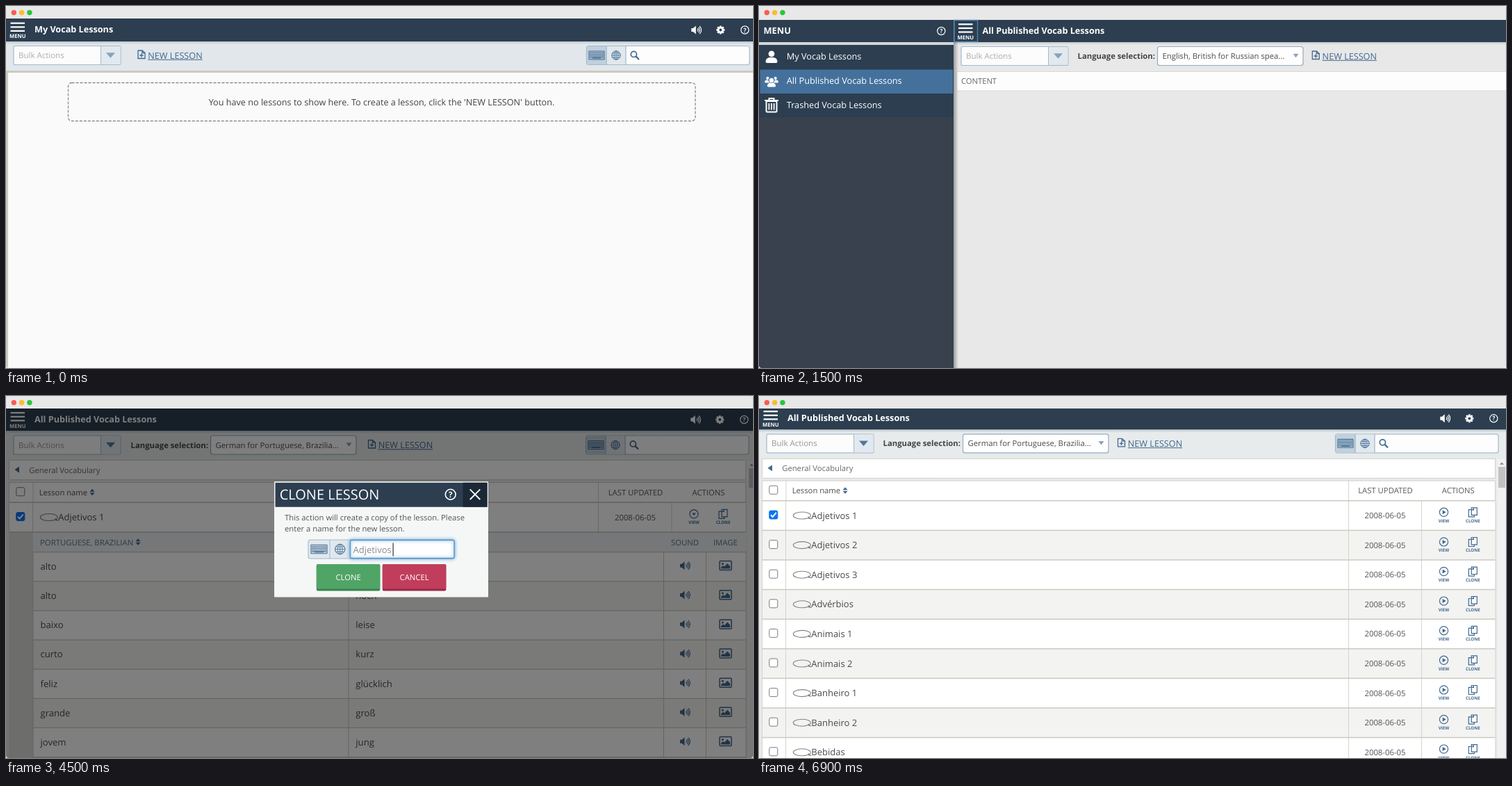
Write an HTML page with a canvas that moves like this. It is 1075x521 px and loops after 7500 ms.

```html
<!DOCTYPE html>
<html lang="en">
<head>
<meta charset="utf-8">
<title>Vocab lessons</title>
<style>
html, body { margin: 0; width: 100%; height: 100%; overflow: hidden; background: #fff; }
canvas { display: block; width: 1075px; height: 521px; }
</style>
</head>
<body>
<canvas id="stage"></canvas>
<script>
const W = 1075, H = 521, HOLD = 1500;
const NAVY = '#2c3e50', BLUE = '#41698f', PALE = '#86a4be', EDGE = '#a5bacb', INK = '#4c4c4c';
const canvas = document.getElementById('stage');
const c = canvas.getContext('2d');
const ratio = window.devicePixelRatio || 1;
canvas.width = W * ratio;
canvas.height = H * ratio;

// ---- primitives ----
function rect(x, y, w, h, fill) {
  c.fillStyle = fill;
  c.fillRect(x, y, w, h);
}

function box(x, y, w, h, fill, edge, r = 0, line = 1) {
  c.beginPath();
  c.roundRect(x, y, w, h, r);
  if (fill) { c.fillStyle = fill; c.fill(); }
  if (edge) { c.strokeStyle = edge; c.lineWidth = line; c.stroke(); }
}

// y is the middle of the capital letters
function text(s, x, y, size, color = INK, weight = 400, align = 'left', family = '"Open Sans", sans-serif') {
  c.font = `${weight} ${size}px ${family}`;
  c.textAlign = align;
  c.fillStyle = color;
  c.fillText(s, x, y + size * 0.357);
  return c.measureText(s).width;
}

function poly(points, fill) {
  c.beginPath();
  points.forEach(([x, y]) => c.lineTo(x, y));
  c.closePath();
  c.fillStyle = fill;
  c.fill();
}

function lines(color, width, ...paths) {
  c.strokeStyle = color;
  c.lineWidth = width;
  c.beginPath();
  for (const p of paths) p.forEach(([x, y], i) => i ? c.lineTo(x, y) : c.moveTo(x, y));
  c.stroke();
}

function ring(x, y, rx, ry, color, width, from = 0, to = Math.PI * 2) {
  c.beginPath();
  c.ellipse(x, y, rx, ry, 0, from, to);
  c.strokeStyle = color;
  c.lineWidth = width;
  c.stroke();
}

function disc(x, y, r, color) {
  c.beginPath();
  c.arc(x, y, r, 0, Math.PI * 2);
  c.fillStyle = color;
  c.fill();
}

function fade(x, y, w, h, from, to, across) {
  const g = c.createLinearGradient(x, y, across ? x + w : x, across ? y : y + h);
  g.addColorStop(0, from);
  g.addColorStop(1, to);
  rect(x, y, w, h, g);
}

const down = (x, y, w, h, color) =>
  poly([[x - w / 2, y - h / 2], [x + w / 2, y - h / 2], [x, y + h / 2]], color);

// ---- icons ----
function speaker(x, y, color) {
  poly([[x - 7, y - 2.5], [x - 4.5, y - 2.5], [x - 0.5, y - 6], [x - 0.5, y + 6], [x - 4.5, y + 2.5], [x - 7, y + 2.5]], color);
  for (const r of [2.6, 5, 7.3]) ring(x, y, r, r, color, 1.2, -0.85, 0.85);
}

function gear(x, y) {
  for (let i = 0; i < 4; i++) {
    c.save();
    c.translate(x, y);
    c.rotate(i * Math.PI / 4);
    rect(-1.4, -6, 2.8, 12, '#fff');
    c.restore();
  }
  disc(x, y, 4.6, '#fff');
  disc(x, y, 1.9, NAVY);
}

function help(x, y, r = 5.6) {
  ring(x, y, r, r, '#fff', r / 4.6);
  text('?', x, y, r * 1.55, '#fff', 700, 'center');
}

function keyboard(x, y, w = 22, color = BLUE) {
  const h = w * 0.54, step = w / 11;
  box(x - w / 2, y - h / 2, w, h, null, color, 0.5, 1.1);
  for (let row = 0; row < 4; row++)
    for (let i = 0; i < 10; i++)
      rect(x - w / 2 + step * (i + 0.65), y - h / 2 + 1.5 + row * (h - 2.5) / 4, step * 0.72, step * 0.8, color);
  rect(x - w * 0.28, y + h / 2 - 3.2, w * 0.56, 1.8, color);
}

function globe(x, y, r = 6.2, color = BLUE) {
  ring(x, y, r, r, color, 1);
  ring(x, y, r * 0.48, r, color, 0.8);
  const k = r * 0.87, q = r * 0.5;
  lines(color, 0.8, [[x - r, y], [x + r, y]], [[x, y - r], [x, y + r]],
    [[x - k, y - q], [x + k, y - q]], [[x - k, y + q], [x + k, y + q]]);
}

function search(x, y) {
  ring(x - 1.6, y - 1.6, 4.1, 4.1, BLUE, 1.7);
  lines(BLUE, 2.2, [[x + 1.6, y + 1.6], [x + 6, y + 6]]);
}

function page(x, y) {
  lines(BLUE, 1.3, [[x, y - 6], [x + 6, y - 6], [x + 10, y - 2.5], [x + 10, y + 5.5], [x, y + 5.5], [x, y - 6.6]],
    [[x + 6, y - 6], [x + 6, y - 2.5], [x + 10, y - 2.5]],
    [[x + 2.3, y + 1], [x + 7.7, y + 1]], [[x + 5, y - 1.7], [x + 5, y + 3.7]]);
}

function picture(x, y) {
  box(x - 8.5, y - 6.5, 17, 13, null, BLUE, 1, 1.5);
  disc(x - 4.2, y - 2.5, 1.5, BLUE);
  poly([[x - 6.5, y + 4.5], [x - 6.5, y + 2.5], [x - 3.5, y], [x - 1.5, y + 1.5], [x + 2.5, y - 3], [x + 6.5, y + 1], [x + 6.5, y + 4.5]], BLUE);
}

function person(x, y, s, color = '#fff') {
  disc(x, y - 4.2 * s, 4.4 * s, color);
  c.beginPath();
  c.roundRect(x - 8.5 * s, y + 1 * s, 17 * s, 8 * s, [6 * s, 6 * s, 2 * s, 2 * s]);
  c.fillStyle = color;
  c.fill();
}

function trash(x, y) {
  box(x - 7.5, y - 6, 15, 15.5, null, '#fff', 1.5, 2);
  lines('#fff', 2, [[x - 10, y - 7], [x + 10, y - 7]], [[x - 3.5, y - 7], [x - 3.5, y - 10], [x + 3.5, y - 10], [x + 3.5, y - 7]]);
  lines('#fff', 1.8, ...[-3.6, 0, 3.6].map(d => [[x + d, y - 3], [x + d, y + 6.5]]));
}

function loopMark(x, y) {
  ring(x, y, 12.5, 5, '#858585', 1.1, 0.75, Math.PI * 2 + 0.25);
  lines('#777', 1.1, [[x + 12.3, y + 1], [x + 10, y + 4], [x + 13.5, y + 4.6]], [[x + 10, y + 4], [x + 9, y + 1.5]]);
}

function check(x, y, on) {
  box(x - 6, y - 6, 12, 12, on ? '#0b74f0' : '#fff', on ? '#0b74f0' : '#7b7b7b', 2, 1);
  if (on) lines('#fff', 2, [[x - 3.8, y + 0.2], [x - 1.2, y + 2.9], [x + 4, y - 3.2]]);
}

function rowActions(view, clone, y, open) {
  ring(view, y - 4.2, 6.1, 6.1, BLUE, 1.2);
  if (open) down(view, y - 3.7, 5.5, 3.6, BLUE);
  else poly([[view - 1.8, y - 7.2], [view + 3.2, y - 4.2], [view - 1.8, y - 1.2]], BLUE);
  text('VIEW', view, y + 8, 6.2, BLUE, 700, 'center');
  lines(BLUE, 1.2, [[clone - 2, y - 7.8], [clone - 6, y - 7.8], [clone - 6, y + 2.4], [clone + 2, y + 2.4], [clone + 2, y]]);
  box(clone - 2, y - 10.6, 8, 10.4, '#fff', BLUE, 0, 1.2);
  poly([[clone - 2, y - 7], [clone + 1.7, y - 7], [clone + 1.7, y - 10.6]], BLUE);
  text('CLONE', clone, y + 8, 6.2, BLUE, 700, 'center');
}

// ---- widgets ----
function titleBar(h) {
  rect(0, 0, W, h, '#e8e8e8');
  ['#f85d52', '#fbbb30', '#2ac63f'].forEach((color, i) => disc(11.3 + i * 11.3, 9.5, 3.7, color));
}

function header(x, top, bottom, title, y) {
  rect(x, top, W - x, bottom - top, NAVY);
  for (const d of [-9, -3.4, 2.2]) rect(x + 6.5, y + d - 1.1, 20.5, 2.2, '#fff');
  text('MENU', x + 16.8, y + 9.8, 7.7, '#fff', 700, 'center');
  text(title, x + 41, y, 12.65, '#fff', 700);
}

function headerIcons(right, y) {
  speaker(right - 70, y, '#fff');
  gear(right - 35, y);
  help(right, y);
}

function bulk(x, y, strong) {
  box(x, y - 13.5, 154, 27, '#fcfcfc', EDGE, 2, 1.2);
  rect(x + 126, y - 13, 27.5, 26, '#e2e9ee');
  lines(EDGE, 1, [[x + 125.5, y - 13.5], [x + 125.5, y + 13.5]]);
  text('Bulk Actions', x + 7, y, 11.5, strong ? '#959595' : '#adadad');
  down(x + 139.5, y, 13, 7.5, strong ? '#4b779f' : PALE);
}

function select(x, y, w, label) {
  box(x, y - 13.5, w, 27, '#fefefe', '#94acc0', 3, 1.2);
  text(label, x + 7, y, 11.3);
  down(x + w - 10.5, y - 0.5, 8, 5.5, PALE);
}

function link(label, x, y, size = 12.65, weight = 400, family) {
  const w = text(label, x, y, size, BLUE, weight, 'left', family);
  rect(x, y + size * 0.357 + 1.3, w, 1, BLUE);
}

function newLesson(x, y) {
  page(x, y - 1);
  link('NEW LESSON', x + 14.3, y);
}

function searchGroup(right, y) {
  box(right - 234.5, y - 13.5, 234.5, 27, '#fdfdfd', EDGE, 3, 1.2);
  rect(right - 234, y - 13, 28, 26, '#c0d0dd');
  rect(right - 206, y - 13, 28, 26, '#e1e8ee');
  lines('#92acc1', 1, [[right - 206, y - 13.5], [right - 206, y + 13.5]], [[right - 178, y - 13.5], [right - 178, y + 13.5]]);
  keyboard(right - 220, y);
  globe(right - 192, y);
  search(right - 165, y);
}

function language(x, y, label) {
  text('Language selection:', x, y, 11.3, '#444', 700);
  select(x + 115, y, 209.5, label);
}

function button(x, y, label, fill, base, ink = '#fff') {
  box(x, y, 91.5, 38.5, base, null, 2);
  box(x, y, 91.5, 35.5, fill, null, 2);
  text(label, x + 45.8, y + 19, 11.3, ink, 400, 'center');
}

function dialog(x, y, w, h, title, size, body) {
  box(x, y, w, h, body, '#f3f3ef', 0, 1);
  rect(x + 1, y + 1.2, w - 2, 35, NAVY);
  rect(x + w - 36, y + 1.2, 35, 35, '#1b2836');
  const m = y + 18.2, k = x + w - 18.5;
  text(title, x + 7.2, m, size, '#fff');
  help(x + w - 53.8, m, 7.4);
  lines('#fff', 1.8, [[k - 7.3, m - 7.3], [k + 7.3, m + 7.3]], [[k + 7.3, m - 7.3], [k - 7.3, m + 7.3]]);
}

function nameInput(x, y, split, field, right, soft) {
  box(x, y - 13.5, right - x, 27, '#e0e8ee', EDGE, 3, 1.1);
  lines(EDGE, 1, [[split, y - 13.5], [split, y + 13.5]]);
  const color = soft ? '#7d9dba' : BLUE;
  keyboard((x + split) / 2, y, soft ? 19 : 23, color);
  globe((split + field) / 2, y, soft ? 5.2 : 7.2, color);
  c.save();
  c.shadowColor = '#5aa2e0';
  c.shadowBlur = 5;
  box(field, y - 13, right - field, 26, '#fff', '#5c94c4', 2, 1.4);
  c.restore();
}

function dim() {
  rect(0, 0, W, H, 'rgba(0,0,0,.5)');
}

// ---- scenes ----
function emptyPage() {
  rect(0, 0, W + 10, H + 10, '#fafafa');
  rect(0, 51, W + 10, 43, '#e1e7eb');
  fade(0, 51, W + 10, 4, '#bcc6ce', '#e1e7eb');
  rect(0, 93, W + 10, 3, '#cecabf');
  rect(0, 94, 3, H, '#cecabf');
  header(0, 18, 51, 'My Vocab Lessons', 33.7);
  rect(W, 18, 10, 33, NAVY);
  headerIcons(1063.3, 34.5);
  bulk(11, 71);
  newLesson(190, 71);
  searchGroup(1070, 71);
  c.setLineDash([4, 2]);
  box(89.5, 110.5, 902.5, 55, null, '#8b8b8b', 5, 1.3);
  c.setLineDash([]);
  text("You have no lessons to show here. To create a lesson, click the 'NEW LESSON' button.", 540.5, 138, 12.63, '#444', 400, 'center');
}

function sceneEmpty() {
  emptyPage();
  titleBar(18);
}

function sceneMenu() {
  rect(0, 0, W, H, '#e8e8e8');
  titleBar(20);
  fade(280, 52, W - 280, 4, '#c4cace', '#e6e9ea');
  header(280.5, 20, 52, 'All Published Vocab Lessons', 35.3);
  box(281, 20.5, 33.5, 31, null, '#4d84b5', 0, 1.3);
  bulk(291, 72);
  language(458.5, 72, 'English, British for Russian spea...');
  newLesson(796.3, 72);
  box(284.5, 94.5, 800, 27.5, '#fdfdfd', '#dadada');
  text('CONTENT', 291, 108, 11.2, '#666');

  rect(0, 20, 280, H, '#38414d');
  rect(0, 20, 280, 140, NAVY);
  rect(0, 52, 280, 4, '#d3d7d9');
  rect(1.5, 91.5, 277.5, 34.5, '#44719c');
  fade(280, 52, 7, H, 'rgba(0,0,0,.32)', 'rgba(0,0,0,0)', true);
  text('MENU', 6.5, 35.3, 12.8, '#fff', 700);
  help(262.3, 36);
  ['My Vocab Lessons', 'All Published Vocab Lessons', 'Trashed Vocab Lessons']
    .forEach((s, i) => text(s, 39.8, 72.8 + i * 35, 12.7, '#fff'));
  person(18, 73, 1);
  person(12.5, 106, 0.5);
  person(23.5, 106, 0.5);
  disc(18, 106.5, 4.6, '#44719c');
  person(18, 110, 0.72);
  trash(18, 143);
}

function sceneNew() {
  c.save();
  c.translate(-1, -0.6);
  c.scale(0.998, 0.998);
  emptyPage();
  c.restore();
  dim();
  titleBar(18);
  dialog(328, 142, 420.5, 287.5, 'NEW LESSON', 15.8, '#f9f7f2');
  box(344, 185.5, 389.5, 182, '#fafafa', '#cfd8dd');
  box(344, 185.5, 389.5, 28.5, '#eaf4fd', '#cbd9e3');
  text('CREATE NEW LESSON', 357.5, 199.8, 14, '#647f96');
  ['Learning language:', 'Known language:', 'Lesson name:']
    .forEach((s, i) => text(s, 480, 232.8 + i * 37.1, 11.35, '#505050', 400, 'right'));
  select(482, 233, 210, 'English, British');
  select(482, 270.2, 210, 'Russian');
  nameInput(482, 307, 511, 539, 691.5, true);
  rect(543.2, 299, 1.2, 18, '#333');
  lines(BLUE, 1.5, [[452, 331.5], [445.5, 331.5], [445.5, 342.5], [456.5, 342.5], [456.5, 337]]);
  lines(BLUE, 2, [[457.5, 330.5], [450, 338]], [[449.5, 333.5], [449.5, 338.5], [454.5, 338.5]]);
  link('IMPORT EXISTING LESSON', 461.8, 338, 12.65, 700, '"Liberation Sans", Arial, sans-serif');
  button(445, 373, 'CREATE', '#b4d5bb', '#a2c3a9', '#f4faf5');
  button(540, 373, 'CANCEL', '#c13d5c', '#982b46');
}

// shared top of both lesson lists
function listPage(bottom, titleY, barY, right, crumbY, headY) {
  rect(0, 0, W, H, '#e8ebec');
  header(0, 18, bottom, 'All Published Vocab Lessons', titleY);
  fade(0, bottom, W, 4, '#bfc7cd', '#e6eaec');
  bulk(11, barY, true);
  newLesson(right - 547.5, barY);
  searchGroup(right, barY);
  return { crumbY, headY };
}

function listHead(crumbY, headY, edge, dateX, cols) {
  box(4.5, crumbY - 14, edge - 4.5, 28, '#fff', '#cfcfc9');
  poly([[12.5, crumbY - 0.5], [19, crumbY - 5], [19, crumbY + 4]], BLUE);
  text('General Vocabulary', 33.2, crumbY, 11.25, '#6a6a6a');
  box(4.5, headY - 14, edge - 4.5, 28.5, '#fff', '#cfcfc9');
  check(20.8, headY - 0.8);
  text('Lesson name', 47.7, headY, 11.25, '#505050');
  sorter(124, headY);
  text('LAST UPDATED', dateX, headY, 11.3, '#5a5a5a', 400, 'center');
  text('ACTIONS', (cols[2] + edge) / 2, headY, 11.3, '#5a5a5a', 400, 'center');
  for (const x of [38.5, cols[1]]) rect(x, headY - 14, 1, 28, '#d3d3cd');
}

function sorter(x, y) {
  down(x, y + 2.8, 7, 4, BLUE);
  down(x, y - 2.8, 7, -4, BLUE);
}

function lessonRow(y, name, edge, cols, dateX, view, clone, on, open, even) {
  rect(4, y - 21, edge - 4, 42.6, even ? '#f3f3f2' : '#fff');
  for (const x of [4, 38, cols[1], cols[2], edge]) rect(x, y - 21, 1, 42.6, '#d6d3c9');
  rect(4, y - 21.5, edge - 4, 1.5, '#cbcac1');
  check(20.8, y - 0.5, on);
  loopMark(61.8, y + 0.5);
  text(name, 75.3, y + 0.5, 13, '#4a4a4a');
  text('2008-06-05', dateX, y + 0.5, 11.35, '#555', 400, 'center');
  rowActions(view, clone, y, open);
}

function sceneClone() {
  listPage(50, 33.2, 70.5, 1069);
  headerIcons(1062.3, 34);
  language(179.5, 70.5, 'German for Portuguese, Brazilia...');
  const cols = [38, 852, 957.5], edge = 1064.5;
  listHead(106.5, 138.5, edge, 906, cols);
  lessonRow(174, 'Adjetivos 1', edge, cols, 905.5, 990, 1032, true, true);
  rect(4, 195, 1061, H, '#dcdcda');
  rect(39, 195, 1026, 29, '#ebeff2');
  rect(4, 195, 1061, 1.5, '#c6c5bd');
  text('PORTUGUESE, BRAZILIAN', 49, 210.5, 11.35, '#587590');
  sorter(190, 210);
  text('SOUND', 977, 210.5, 11.3, '#587590', 400, 'center');
  text('IMAGE', 1035.3, 210.5, 11.3, '#587590', 400, 'center');
  const pairs = [['alto', 'groß'], ['alto', 'hoch'], ['baixo', 'leise'], ['curto', 'kurz'],
    ['feliz', 'glücklich'], ['grande', 'groß'], ['jovem', 'jung']];
  pairs.forEach(([from, to], i) => {
    const y = 245.3 + i * 42.15;
    rect(39, y - 21, 1026, 42.15, i % 2 ? '#f5f5f4' : '#fff');
    rect(39, y - 21.3, 1026, 1.2, '#c9c8c0');
    text(from, 49.5, y, 13.1, '#4a4a4a');
    text(to, 503.3, y, 13.1, '#4a4a4a');
    speaker(977, y - 1, BLUE);
    picture(1035.5, y - 1.2);
  });
  rect(39, 519.3, 1026, 1.2, '#c9c8c0');
  for (const x of [38.5, 492.5, 946, 1007, 1064.5]) rect(x, 224, 1, H, '#c9c8c0');
  rect(1067, 94, 8, H, '#f0f0f0');
  down(1073, 99, 5, -3, '#777');
  rect(1069, 104, 6, 28, '#bdbdbd');
  dim();
  titleBar(18);

  dialog(386.5, 123.5, 307, 165.5, 'CLONE LESSON', 20, '#f5f7f7');
  text('This action will create a copy of the lesson. Please', 401, 175, 11.28, '#555');
  text('enter a name for the new lesson.', 401, 191.3, 11.28, '#555');
  nameInput(435, 220.5, 466, 495.5, 645);
  text('Adjetivos', 499.5, 221, 13, '#8a8a8a');
  rect(556.5, 211.5, 1.2, 19, '#333');
  button(446.8, 242, 'CLONE', '#50a465', '#3a8550');
  button(541.8, 242, 'CANCEL', '#c13d5c', '#982b46');
}

function sceneList() {
  listPage(48.5, 31.2, 68.3, 1064);
  headerIcons(1057.3, 32.3);
  language(178.5, 68.3, 'German for Portuguese, Brazilia...');
  const cols = [38, 848, 953], edge = 1059.5;
  listHead(104.3, 136, edge, 901.5, cols);
  ['Adjetivos 1', 'Adjetivos 2', 'Adjetivos 3', 'Advérbios', 'Animais 1', 'Animais 2',
    'Banheiro 1', 'Banheiro 2', 'Bebidas'].forEach((name, i) =>
    lessonRow(171.5 + i * 42.6, name, edge, cols, 901, 985.5, 1027.3, i === 0, false, i % 2));
  rect(1062.5, 91, 12.5, H, '#f1f1f1');
  down(1069, 97, 6, -3.5, '#8b8b8b');
  rect(1064, 102, 10, 30, '#c2c2c2');
  titleBar(18);
}

const scenes = [sceneEmpty, sceneMenu, sceneNew, sceneClone, sceneList];
const start = performance.now();

function draw() {
  const t = performance.now() - start;
  c.setTransform(ratio, 0, 0, ratio, 0, 0);
  c.textRendering = 'geometricPrecision';
  rect(0, 0, W, H, '#fff');
  c.save();
  c.beginPath();
  c.roundRect(0, 0, W, H, 4);
  c.clip();
  scenes[Math.floor(t / HOLD) % scenes.length]();
  c.restore();
  requestAnimationFrame(draw);
}
draw();
</script>
</body>
</html>
```
